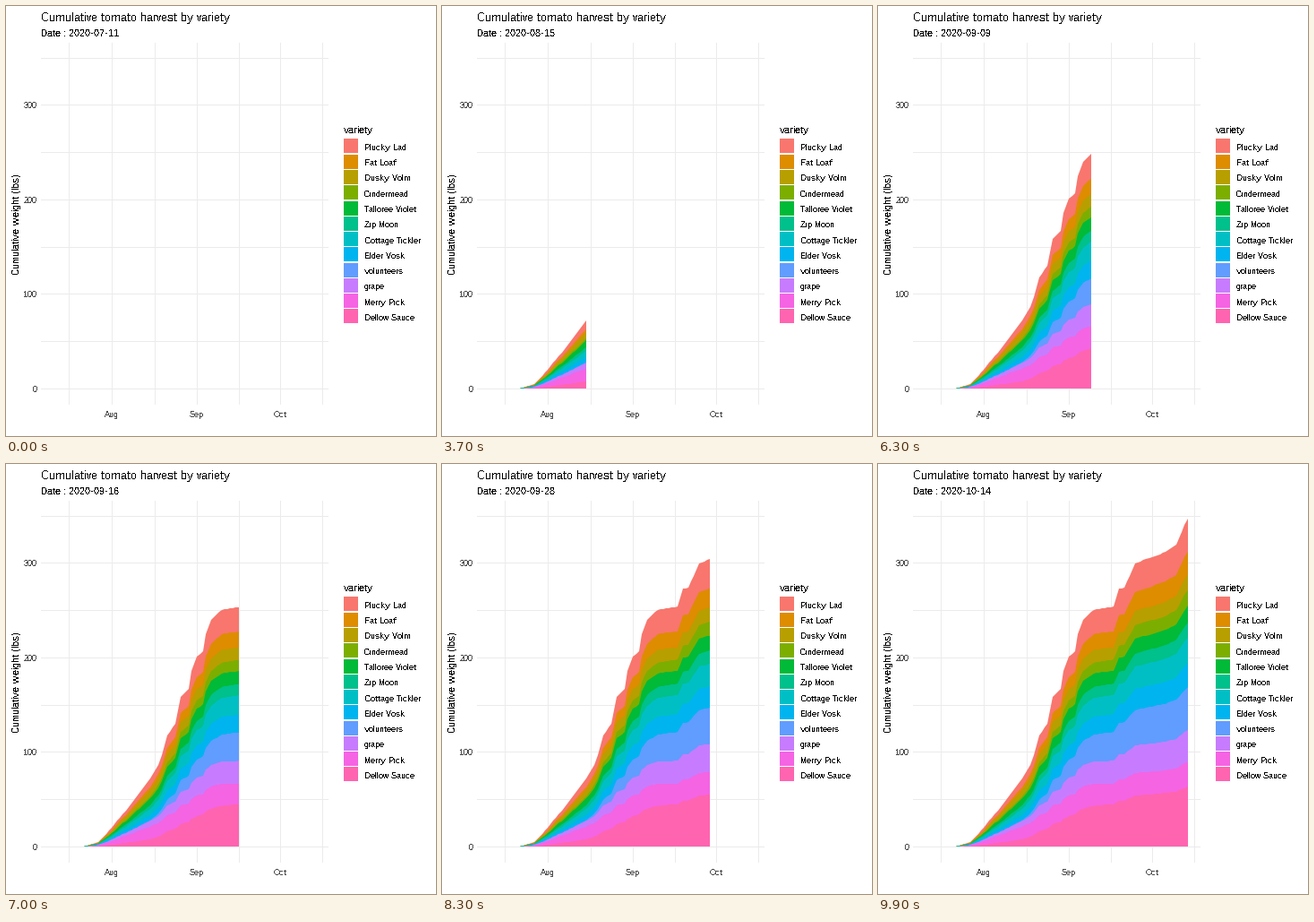
Animation, 480 px wide and 480 px high, one loop 10000 ms. Source, as a matplotlib script:

```python
import math

import matplotlib.pyplot as plt
import numpy as np
from matplotlib.animation import FuncAnimation
from matplotlib.collections import PolyCollection
from matplotlib.patches import Rectangle

plt.rcParams.update({
    "font.family": "Liberation Sans",
    "text.hinting": "native",
    "text.hinting_factor": 1,
    "text.antialiased": False,
})

SIZE, DPI = 480, 96
FRAMES, INTERVAL = 100, 100
START, DAYS, FIRST_PICK = np.datetime64("2020-07-11"), 95, 10
GRID, TICK = "#EBEBEB", "#4D4D4D"

# Name, colour, early and late share of the harvest in percent
VARIETIES = [
    ("Plucky Lad", "#F8766D", 12, 10),
    ("Fat Loaf", "#DE8C00", 5, 6.9),
    ("Dusky Volm", "#B79F00", 8.5, 4.8),
    ("Cindermead", "#7CAE00", 3.4, 4.8),
    ("Talloree Violet", "#00BA38", 9.6, 5),
    ("Zip Moon", "#00C08B", 5.5, 4.6),
    ("Cottage Tickler", "#00BFC4", 9, 7.8),
    ("Elder Vosk", "#00B4F0", 8, 7.4),
    ("volunteers", "#619CFF", 0.7, 13.2),
    ("grape", "#C77CFF", 8, 9.8),
    ("Merry Pick", "#F564E3", 19, 7.4),
    ("Dellow Sauce", "#FF64B0", 11, 18.5),
]
EARLY, LATE = np.array([v[2:] for v in VARIETIES]).T

# Turning points of the total: day and pounds
TURNS = [(10, 0), (16, 5), (21, 20), (28, 46), (35, 72), (38, 87), (41, 118),
         (44, 130), (46, 159), (49, 167), (50, 186), (52, 201), (54, 207),
         (55, 225), (57, 240), (61, 251), (68, 254), (70, 273), (72, 274),
         (76, 300), (87, 312), (91, 320), (95, 347)]


def day_x(day):
    return 53.7 + 3.072 * day


def lbs_y(lbs):
    return 427.4 - 1.055 * lbs


def stack(days):
    """Running totals per variety, tallest first."""
    late = 1 - np.exp(-np.maximum(days - 35, 0) / 14)
    share = EARLY[:, None] * (1 - late) + LATE[:, None] * late
    upward = np.cumsum(share[::-1], axis=0)[::-1]
    return upward / upward[0] * np.interp(days, *zip(*TURNS))


SEASON = np.arange(FIRST_PICK, DAYS + 1)
XS = np.round(day_x(SEASON))
TOPS = np.round(lbs_y(stack(SEASON)))
BASE = round(lbs_y(0))
DAY_FRAMES = np.round(np.arange(DAYS + 1) * (FRAMES - 1) / DAYS)


def areas(day):
    """Areas down to the baseline; each shorter one covers the one before."""
    n = day - FIRST_PICK + 1
    if n < 2:
        return []
    xs = np.r_[XS[:n], XS[n - 1], XS[0]]
    return [np.column_stack([xs, np.r_[top[:n], BASE, BASE]]) for top in TOPS]


fig = plt.figure(figsize=(SIZE / DPI, SIZE / DPI), dpi=DPI, facecolor="white")
ax = fig.add_axes([0, 0, 1, 1])
ax.set(xlim=(0, SIZE), ylim=(SIZE, 0))
ax.axis("off")


def box(x, y, w, h, color):
    ax.add_patch(Rectangle((x, y), w, h, fc=color, lw=0, antialiased=False))


def label(x, y, text, px, color="black", **kw):
    return ax.text(x, y, text, fontsize=px * 72 / DPI, color=color, **kw)


for lbs in range(0, 351, 50):
    y = math.floor(lbs_y(lbs))
    box(39, y, 321, 1, GRID)
    if lbs % 100 == 0:
        label(34.5, y + 4, str(lbs), 9, TICK, ha="right")
for x in (70, 118, 166, 213, 260, 306, 353):
    box(x, 41, 1, 404, GRID)
for month, x in (("Aug", 118), ("Sep", 213), ("Oct", 306)):
    label(x, 459, month, 9, TICK, ha="center")

label(39, 17, "Cumulative tomato harvest by variety", 13)
date = label(39, 34, "", 11)
label(17, 244, "Cumulative weight (lbs)", 11, rotation=90,
      ha="right", va="center")

label(377, 142, "variety", 11)
for i, (name, color, *_) in enumerate(VARIETIES):
    top = 147.9 + 17.28 * i
    box(377, math.ceil(top), 16, 16, color)
    label(400, round(top + 13), name, 9)

harvest = PolyCollection([], facecolors=[v[1] for v in VARIETIES],
                         edgecolors="none", linewidths=0, zorder=2)
ax.add_collection(harvest, autolim=False)


def update(i):
    date.set_text(f"Date : {START + i * DAYS // (FRAMES - 1)}")
    harvest.set_verts(areas(np.sum(DAY_FRAMES <= i) - 1))
    return harvest, date


anim = FuncAnimation(fig, update, frames=FRAMES, interval=INTERVAL,
                     repeat=True, repeat_delay=0)
plt.show()
```
